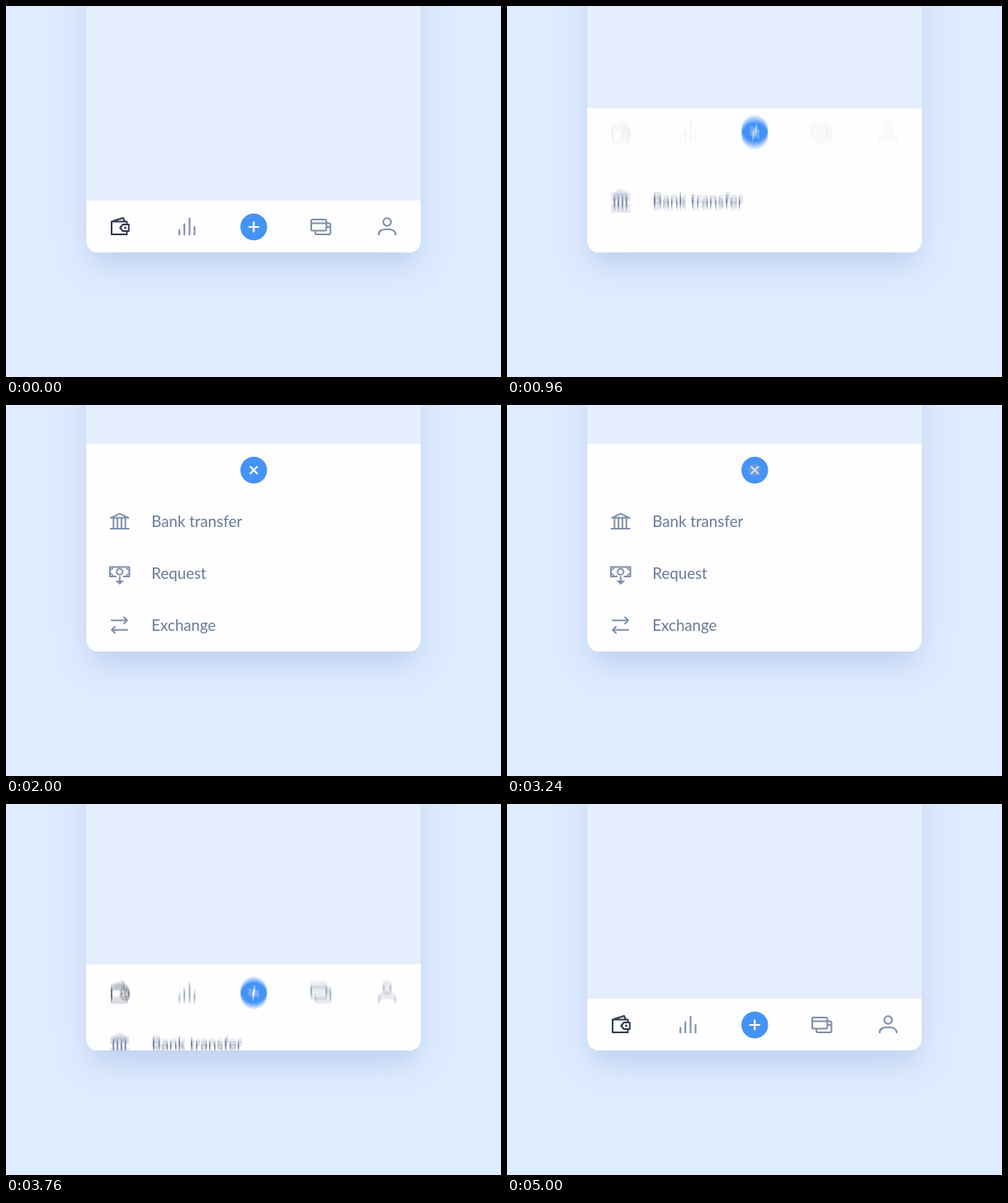
An HTML page with a canvas for the animation above (5.4 s loop, 600x450 px).

```html
<!DOCTYPE html>
<html lang="en">
<head>
<meta charset="utf-8">
<title>Expanding tab bar</title>
<style>
  html, body { margin: 0; width: 100%; height: 100%; overflow: hidden; background: #dfebfe; }
  canvas { display: block; }
</style>
</head>
<body>
<canvas id="stage" width="600" height="450"></canvas>
<script>
const LOOP = 5400;
const CLOSED = 236, OPEN = 47;
const CARD = { x: 97.5, right: 502.5, bottom: 299, radius: 14 };
const COLOR = {
  back: '#dfebfe', card: '#e5eefe', panel: '#fefdff', blue: '#4593f7',
  dark: '#333c52', nav: '#8190a8', icon: '#8391af', text: '#687b9d'
};
const ITEMS = [
  { label: 'Bank transfer', offset: 94, icon: bankIcon },
  { label: 'Request', offset: 157, icon: requestIcon },
  { label: 'Exchange', offset: 219.5, icon: exchangeIcon }
];
const TAPS = [48, 3208];
const TAP_TIME = 560;
const SHUTTER = 9, SAMPLES = 7;

const stage = document.getElementById('stage').getContext('2d');
const layer = document.createElement('canvas');
layer.width = 600;
layer.height = 450;
const c = layer.getContext('2d');

const clamp = v => Math.min(1, Math.max(0, v));
const mix = (a, b, k) => a + (b - a) * k;

// Bezier easing with flat ends: control points (x1, 0) and (x2, 1).
function ease(x1, x2, x) {
  let lo = 0, hi = 1;
  for (let i = 0; i < 24; i++) {
    const s = (lo + hi) / 2, r = 1 - s;
    if (3 * r * r * s * x1 + 3 * r * s * s * x2 + s * s * s < x) lo = s; else hi = s;
  }
  return lo * lo * (3 - 2 * lo);
}

const MOVES = [
  { start: 630, end: 1200, from: CLOSED, to: 33.4, x1: .75, x2: .42 },
  { start: 1200, end: 1680, from: 33.4, to: OPEN, x1: .2, x2: .2 },
  { start: 3400, end: 3960, from: OPEN, to: 249.5, x1: .75, x2: .42 },
  { start: 3960, end: 4440, from: 249.5, to: CLOSED, x1: .2, x2: .2 }
];

function panelTop(t) {
  let y = CLOSED;
  for (const m of MOVES) {
    if (t < m.start) break;
    y = mix(m.from, m.to, t >= m.end ? 1 : ease(m.x1, m.x2, (t - m.start) / (m.end - m.start)));
  }
  return y;
}

function stroke(path, color, width = 2) {
  c.strokeStyle = color;
  c.lineWidth = width;
  c.lineCap = c.lineJoin = 'round';
  c.stroke(new Path2D(path));
}

function disc(ctx, x, y, r, color) {
  ctx.fillStyle = color;
  ctx.beginPath();
  ctx.arc(x, y, r, 0, Math.PI * 2);
  ctx.fill();
}

function at(x, y, draw) {
  c.save();
  c.translate(x, y);
  draw();
  c.restore();
}

// Icons are drawn around their own centre.
function walletIcon() {
  stroke('M9 -3.5V-6.5H-9.5V9H9V5.5M-8 -7L4.5 -11L6.3 -7', COLOR.dark);
  stroke('M11.3 -3H4.2L.8 1L4.2 5H11.3Z', COLOR.dark);
  disc(c, 7, 1, 1.4, COLOR.dark);
}

function chartIcon() {
  stroke('M-9 3.5V9.3M-3 -3.5V9.3M3.3 -10.3V9.3M9.3 0V9.3', COLOR.nav, 2.1);
}

function cardsIcon() {
  stroke('M-9.5 -9H5.2Q7 -9 7 -7.2V2.8Q7 4.6 5.2 4.6H-9.5Q-11.3 4.6 -11.3 2.8V-7.2Q-11.3 -9 -9.5 -9Z', COLOR.nav);
  stroke('M-11 -4.4H7M8 -4.5H10Q12 -4.5 12 -2.7V7.2Q12 9 10.2 9H-4.5Q-6.3 9 -6.3 7.2V5.5M8 0H11.5', COLOR.nav);
}

function personIcon() {
  stroke('M4.7 -6A4.7 4.7 0 1 1 -4.7 -6A4.7 4.7 0 1 1 4.7 -6Z', COLOR.nav, 2.1);
  stroke('M-10.3 9.3C-10.3 4.5 -6.5 2.8 0 2.8S10.3 4.5 10.3 9.3', COLOR.nav, 2.1);
}

function bankIcon() {
  stroke('M-10.5 -4.2L.2 -9.2L11 -4.2Z', COLOR.icon);
  stroke('M-7.2 -3V7.5M-2.4 -3V7.5M2.4 -3V7.5M7.2 -3V7.5M-10.8 9H11.2', COLOR.icon);
}

function requestIcon() {
  stroke('M-4.5 4H-11.5V-7.5H12V4H5', COLOR.icon);
  stroke('M3.8 -1.8A3.6 3.6 0 1 1 -3.4 -1.8A3.6 3.6 0 1 1 3.8 -1.8Z', COLOR.icon);
  stroke('M-11 -4.3Q-8.2 -4.3 -8.2 -7M11.5 -4.3Q8.7 -4.3 8.7 -7M-11 .8Q-8.2 .8 -8.2 3.5M11.5 .8Q8.7 .8 8.7 3.5', COLOR.icon, 1.6);
  stroke('M.3 4.5V10', COLOR.icon);
  c.fillStyle = COLOR.icon;
  c.fill(new Path2D('M-5 9H5.6L.3 14Z'));
}

function exchangeIcon() {
  stroke('M-9.5 -5.2H9M5.5 -9L9.3 -5.2L5.5 -1.4M9.5 6.3H-9M-5.5 2.5L-9.3 6.3L-5.5 10.1', COLOR.icon);
}

const NAV = [[137.5, walletIcon], [219.2, chartIcon], [381.3, cardsIcon], [462, personIcon]];

function drawTap(t, y) {
  for (const start of TAPS) {
    const k = (t - start) / TAP_TIME;
    if (k <= 0 || k >= 1) continue;
    const r = 36.5 * (1 - Math.pow(1 - k, 4));
    disc(stage, 300.3, y, r, `rgba(150,165,190,${.42 * (1 - k)})`);
  }
}

function drawContent(t) {
  c.fillStyle = COLOR.panel;
  c.fillRect(0, 0, 600, 450);

  const top = panelTop(t), y = top + 32;
  const opened = clamp((CLOSED - top) / (CLOSED - OPEN));
  c.globalAlpha = clamp(1 - 1.5 * opened);
  if (c.globalAlpha > 0) for (const [x, icon] of NAV) at(x, y, icon);
  c.globalAlpha = 1;

  disc(c, 300.3, y, 16.2, COLOR.blue);
  at(300.3, y, () => {
    c.rotate(opened * Math.PI / 4);
    stroke('M-5.6 0H5.6M0 -5.6V5.6', '#fff', 2.2);
  });

  if (opened === 0) return;
  c.font = '18.7px Lato, sans-serif';
  c.textBaseline = 'alphabetic';
  ITEMS.forEach((item, i) => {
    const delay = t < 3000 ? 20 * (i + 1) : 0;
    const iy = panelTop(t - delay) + item.offset;
    at(137.5, iy, item.icon);
    c.fillStyle = COLOR.text;
    c.fillText(item.label, 176.3, iy + 7);
  });
}

function cardPath() {
  stage.beginPath();
  stage.roundRect(CARD.x, -60, CARD.right - CARD.x, CARD.bottom + 60, CARD.radius);
}

function shadow(inset, offset, blur, color) {
  stage.save();
  stage.shadowColor = color;
  stage.shadowBlur = blur;
  stage.shadowOffsetY = offset;
  stage.fillStyle = COLOR.card;
  stage.beginPath();
  stage.roundRect(CARD.x + inset, -60, CARD.right - CARD.x - 2 * inset, CARD.bottom + 60 - inset, CARD.radius);
  stage.fill();
  stage.restore();
}

function render(t) {
  stage.fillStyle = COLOR.back;
  stage.fillRect(0, 0, 600, 450);
  shadow(0, 14, 44, 'rgba(125,160,215,.18)');
  shadow(8, 22, 26, 'rgba(125,160,215,.2)');

  const top = panelTop(t);
  stage.save();
  cardPath();
  stage.fillStyle = COLOR.card;
  stage.fill();
  stage.clip();

  // Average several moments of the panel content for motion blur.
  stage.save();
  stage.beginPath();
  stage.rect(0, top, 600, 450 - top);
  stage.clip();
  const moving = (t > 600 && t < 1800) || (t > 3380 && t < 4460);
  const count = moving ? SAMPLES : 1;
  for (let i = 0; i < count; i++) {
    const shift = moving ? 3 + SHUTTER * (i / (count - 1) - .5) : 0;
    drawContent(t + shift);
    stage.globalAlpha = 1 / (i + 1);
    stage.drawImage(layer, 0, 0);
  }
  stage.restore();

  drawTap(t, top + 32);
  stage.restore();
}

function tick() {
  render(performance.now() % LOOP);
  requestAnimationFrame(tick);
}
tick();
</script>
</body>
</html>
```
